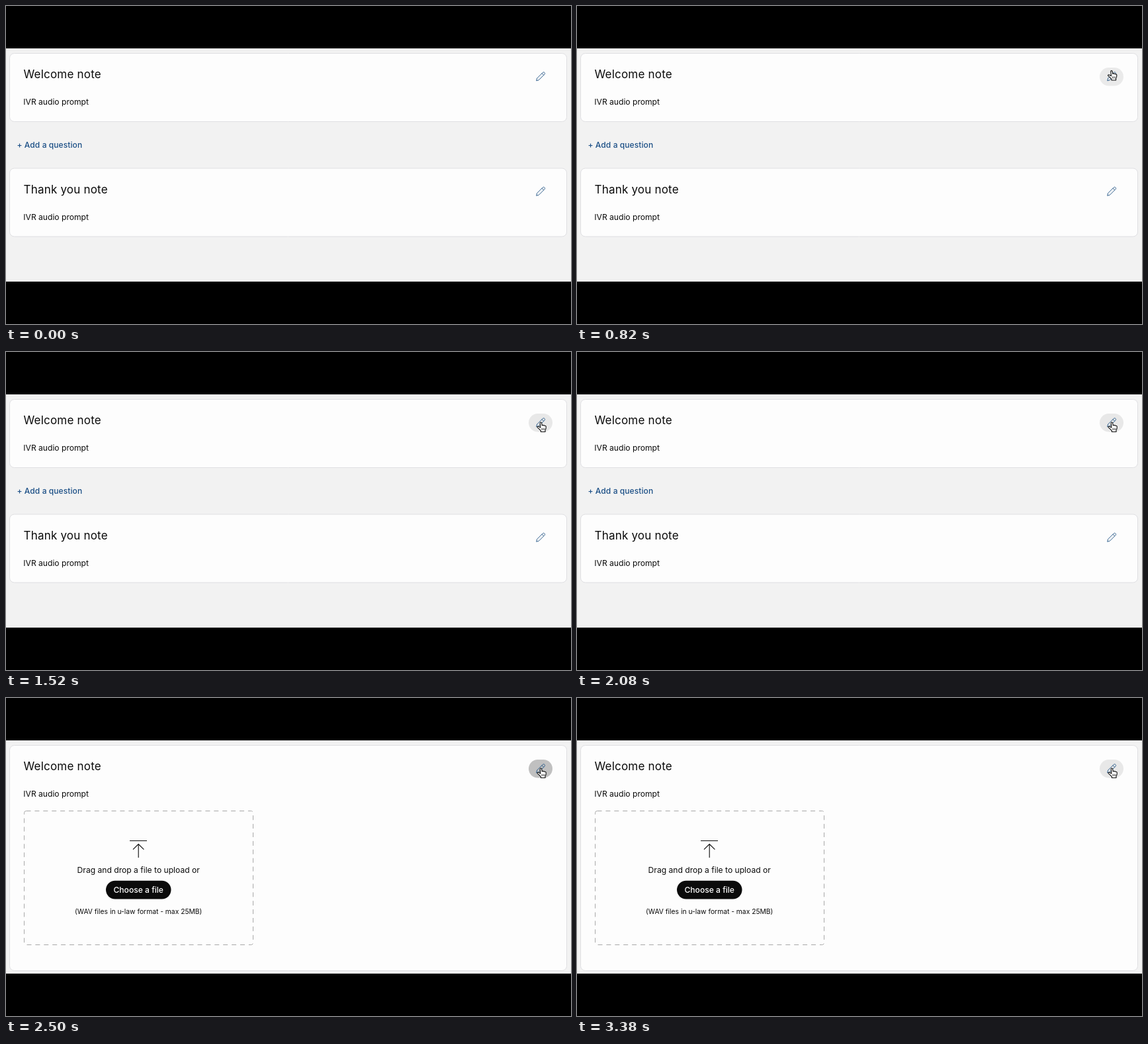
An HTML page with a canvas for the animation above (4.1 s loop, 854 by 480 pixels).

```html
<!DOCTYPE html>
<html lang="en">
<head>
<meta charset="utf-8">
<title>Edit the welcome note</title>
<style>
  html, body { margin: 0; width: 100%; height: 100%; overflow: hidden; background: #000; }
  canvas { display: block; width: 854px; height: 480px; }
</style>
</head>
<body>
<canvas id="stage" width="854" height="480"></canvas>
<script>
const ctx = document.getElementById('stage').getContext('2d');
const LOOP = 4100;
const PRESS_AT = 2380, EXPAND_AT = 2500;
const PAPER = '#fdfdfd', PAGE = '#f2f2f2', EDGE = '#dfdfe2';
const INK = '#0b0b0b', LINK = '#1b4f86', ICON = '#2a5a88';

// Pointer tip: time, x, y
const PATH = [
  [20, 801, 50], [440, 804, 78], [540, 804, 78],
  [1000, 807, 101], [1100, 807, 101], [1280, 807, 106]
];

const ARROW = new Path2D('M0 0V11.6L2.7 9.1L4.6 13.5L6.5 12.7L4.6 8.4H8.2Z');
const HAND = new Path2D('M.2 1.2C.2-.3 2.4-.3 2.6 1.1L3.2 5C3.7 4 5.3 4.1 5.5 5.1' +
  'C6.2 4.4 7.4 4.7 7.6 5.6C8.5 5.2 9.3 5.8 9.3 6.8C9.4 9.2 9 10.6 8 12V14.5H1.4V12.8' +
  'C-.2 11.3-1.4 9.6-3.5 8.1C-4.6 7.1-3.4 5.9-2.1 6.5L.9 8.1Z');
const PENCIL = new Path2D('M1.2 13.8L2.1 10.1L11 1.2C12.5-.1 15 2.3 13.7 3.9' +
  'L4.8 12.8ZM9.5 2.7L12.2 5.4');

const clamp = v => Math.max(0, Math.min(1, v));
const ramp = (t, a, b) => clamp((t - a) / (b - a));
const easeOut = k => 1 - (1 - k) ** 2;

function pointerAt(t) {
  for (let i = 1; i < PATH.length; i++) {
    const [t0, x0, y0] = PATH[i - 1], [t1, x1, y1] = PATH[i];
    if (t < t1) {
      const k = easeOut(ramp(t, t0, t1));
      return [x0 + (x1 - x0) * k, y0 + (y1 - y0) * k];
    }
  }
  return PATH[PATH.length - 1].slice(1);
}

function text(str, x, y, size, { weight = 400, color = INK, align = 'left', spacing = 0 } = {}) {
  ctx.font = `${weight} ${size}px Inter, sans-serif`;
  ctx.letterSpacing = `${spacing}px`;
  ctx.textAlign = align;
  ctx.fillStyle = color;
  ctx.fillText(str, x, y);
}

function box(x, y, w, h, r, fill, stroke) {
  ctx.beginPath();
  ctx.roundRect(x, y, w, h, r);
  if (fill) { ctx.fillStyle = fill; ctx.fill(); }
  if (stroke) { ctx.strokeStyle = stroke; ctx.lineWidth = 1; ctx.stroke(); }
}

function at(x, y, draw) {
  ctx.save();
  ctx.translate(x, y);
  draw();
  ctx.restore();
}

function pencil(y) {
  at(800.5, y, () => {
    ctx.strokeStyle = ICON;
    ctx.lineWidth = 0.95;
    ctx.lineJoin = 'round';
    ctx.stroke(PENCIL);
  });
}

function card(title, y, h) {
  box(5.5, y + 0.5, 842, h, 7, PAPER, EDGE);
  text(title, 26.5, y + 38, 17, { spacing: 0.2 });
  text('IVR audio prompt', 26.3, y + 78, 12.1);
}

function pill(hover, press) {
  const grey = Math.round(232 - 40 * press);
  ctx.globalAlpha = hover;
  box(790, 93, 36, 27.5, 13.75, `rgb(${grey},${grey},${grey})`);
  ctx.globalAlpha = 1;
}

function uploader() {
  ctx.setLineDash([7, 5.9]);
  box(27.5, 170.5, 346, 202, 3, null, '#a8a8a8');
  ctx.setLineDash([]);

  ctx.strokeStyle = INK;
  ctx.lineWidth = 1.1;
  ctx.lineJoin = 'miter';
  ctx.stroke(new Path2D('M187 215.5H213M200.2 241V220.5M192 228.7L200.2 220.5L208.4 228.7'));

  const mid = { align: 'center' };
  text('Drag and drop a file to upload or', 200.2, 264, 12.1, mid);
  box(151, 275.7, 98.5, 27.8, 13.9, INK);
  text('Choose a file', 200.2, 294, 12.1, { ...mid, weight: 500, color: PAPER });
  text('(WAV files in u-law format - max 25MB)', 200.2, 325.7, 10.3, mid);
}

function pointer(x, y) {
  const hand = y >= 94;
  at(x, y, () => {
    ctx.lineJoin = 'round';
    ctx.lineWidth = hand ? 1.1 : 1.6;
    ctx.strokeStyle = hand ? INK : '#fff';
    ctx.fillStyle = hand ? '#fff' : '#000';
    if (hand) {
      ctx.fill(HAND);
      ctx.stroke(HAND);
      ctx.lineWidth = 0.7;
      ctx.stroke(new Path2D('M2.8 8.8V12M4.7 8.8V12M6.6 8.8V12'));
    } else {
      ctx.stroke(ARROW);
      ctx.fill(ARROW);
    }
  });
}

function render(t) {
  const open = t >= EXPAND_AT;
  const hover = ramp(t, 680, 840);
  const press = ramp(t, PRESS_AT - 20, PRESS_AT + 20) * (1 - ramp(t, 2540, 2780));

  ctx.fillStyle = '#000';
  ctx.fillRect(0, 0, 854, 480);
  ctx.save();
  ctx.beginPath();
  ctx.rect(0, 64, 854, 352);
  ctx.clip();
  ctx.fillStyle = PAGE;
  ctx.fillRect(0, 64, 854, 352);

  card('Welcome note', 71, open ? 340 : 103);
  pill(hover, press);
  pencil(99);
  if (open) {
    uploader();
  } else {
    text('+ Add a question', 16.5, 214.3, 12, { weight: 550, color: LINK, spacing: 0.08 });
    card('Thank you note', 244.5, 103);
    pencil(272.5);
  }
  if (t >= 20) pointer(...pointerAt(t));
  ctx.restore();
}

function tick() {
  render(performance.now() % LOOP);
  requestAnimationFrame(tick);
}
tick();
</script>
</body>
</html>
```
